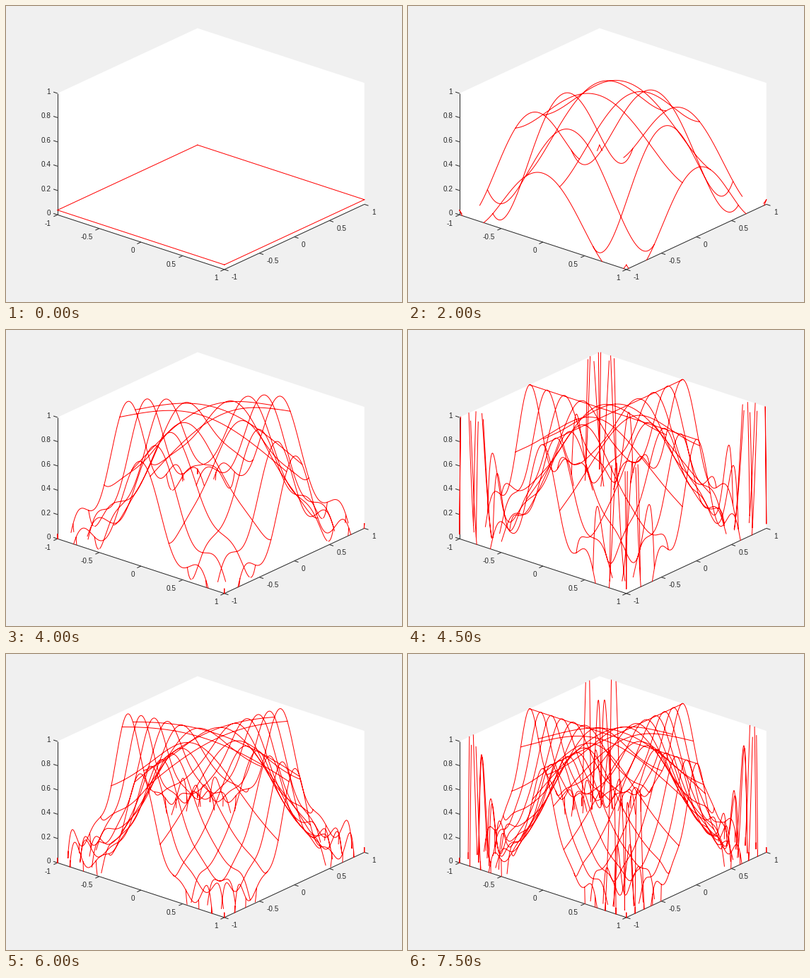
A matplotlib script for the animation above (8000 ms loop, 560x420 px).

```python
"""Equispaced polynomial interpolation of 1 / (1 + 25 x^2 y^2) along grid lines."""
import numpy as np
import matplotlib.pyplot as plt
from matplotlib.animation import FuncAnimation

W, H, DPI = 560, 420, 100
PX = 72 / DPI
INK = "#262626"
FRAMES, INTERVAL = 16, 500

# Orthographic view, stretched to fill the plot box
AZ, EL = np.radians(40), np.radians(35)
LEFT, RIGHT, TOP, BOTTOM = 0.13 * W, 0.905 * W, 0.075 * H, 0.89 * H
C, S = np.cos(AZ), np.sin(AZ)
KX = (RIGHT - LEFT) / (C + S)
KY = (BOTTOM - TOP) / (np.sin(EL) * (C + S) + np.cos(EL))


def project(x, y, z):
    u, v = (x + 1) / 2, (y + 1) / 2
    px = LEFT + KX * (C * u + S * v)
    py = BOTTOM - KY * (np.sin(EL) * (S * (1 - u) + C * v) + np.cos(EL) * z)
    return px, py


def surface(x, y):
    return 1 / (1 + 25 * x**2 * y**2)


def lagrange_basis(nodes, t):
    basis = np.ones((len(nodes), len(t)))
    for i, a in enumerate(nodes):
        for j, b in enumerate(nodes):
            if i != j:
                basis[i] *= (t - b) / (a - b)
    return basis


def clip(t, z):
    """Cut the curve exactly at z = 0 and z = 1, with NaN gaps outside."""
    for level in (0, 1):
        d = z - level
        k = np.flatnonzero((d[:-1] * d[1:] < 0) & (abs(d[:-1] - d[1:]) > 1e-9))
        cut = t[k] + (t[k + 1] - t[k]) * d[k] / (d[k] - d[k + 1])
        t = np.insert(t, k + 1, cut)
        z = np.insert(z, k + 1, level)
    inside = (z > -1e-6) & (z < 1 + 1e-6)
    return t, np.where(inside, z, np.nan)


def mesh(n):
    nodes = np.linspace(-1, 1, n)
    t = np.linspace(-1, 1, 501)
    basis = lagrange_basis(nodes, t)
    xs, ys = [], []
    for c in nodes:
        s, z = clip(t, surface(c, nodes) @ basis)
        for px, py in (project(c, s, z), project(s, c, z)):
            xs += [px, [np.nan]]
            ys += [py, [np.nan]]
    return np.concatenate(xs), np.concatenate(ys)


fig = plt.figure(figsize=(W / DPI, H / DPI), dpi=DPI, facecolor="#f0f0f0")
ax = fig.add_axes([0, 0, 1, 1])
ax.set_xlim(0, W)
ax.set_ylim(H, 0)
ax.axis("off")

box = [(-1, -1, 0), (1, -1, 0), (1, 1, 0), (1, 1, 1), (-1, 1, 1), (-1, -1, 1)]
ax.fill(*zip(*(project(*p) for p in box)), color="white", lw=0)


def stroke(p, q):
    ax.plot(*zip(p, q), color=INK, lw=PX, solid_capstyle="butt")


def ruler(point, values, tick, offset, align):
    stroke(point(values[0]), point(values[-1]))
    for v in values:
        x, y = point(v)
        stroke((x, y), (x + tick[0], y + tick[1]))
        ax.text(x + offset[0], y + offset[1] + 3.6, f"{v:g}", ha=align,
                va="baseline", family="Liberation Sans", size=10 * PX, color=INK)


halves = [-1, -0.5, 0, 0.5, 1]
fifths = [0, 0.2, 0.4, 0.6, 0.8, 1]
ruler(lambda v: project(v, -1, 0), halves, (-5.4, 2.5), (-8.8, 11.7), "right")
ruler(lambda v: project(1, v, 0), halves, (5.7, 1.9), (10.2, 10.8), "left")
ruler(lambda v: project(-1, -1, v), fifths, (-5.7, -1.9), (-9.5, -2.7), "right")

curves, = ax.plot([], [], color="red", lw=PX, solid_joinstyle="round")


def update(i):
    curves.set_data(*mesh(i + 2))
    return curves,


anim = FuncAnimation(fig, update, frames=FRAMES, interval=INTERVAL, repeat=True)
plt.show()
```
